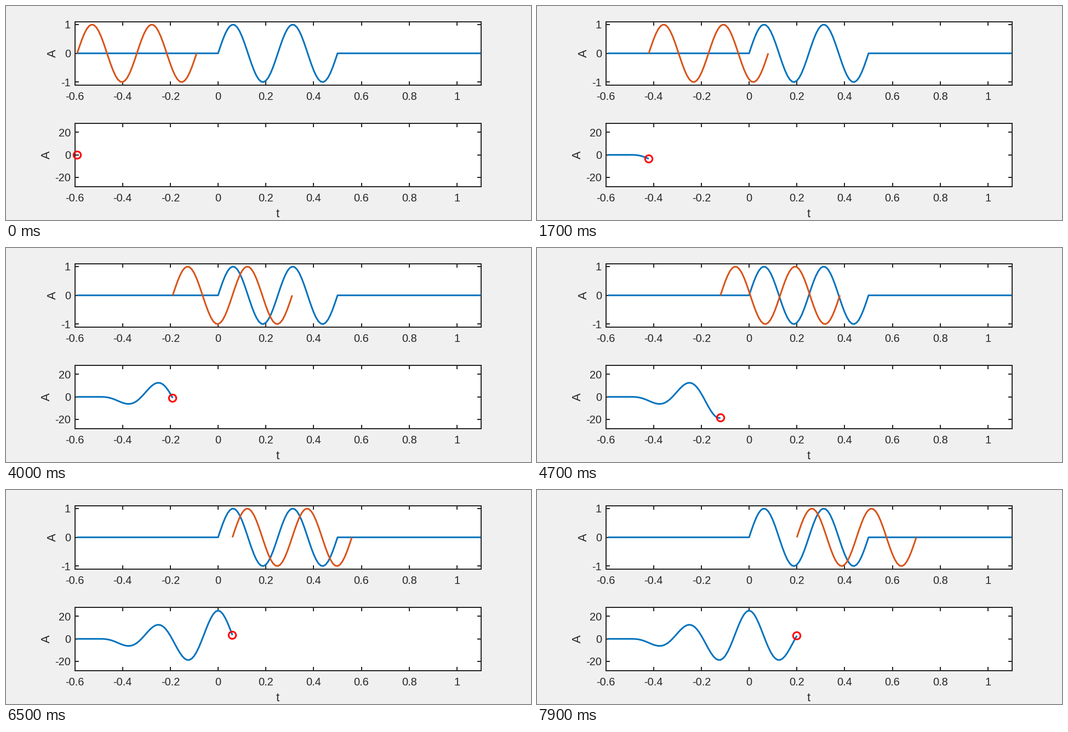
A matplotlib script for the animation above (8 s loop, 958x392 px).

```python
import numpy as np
import matplotlib.pyplot as plt
from matplotlib.animation import FuncAnimation
from matplotlib.patches import Circle
from matplotlib.transforms import Affine2D

W, H, DPI = 958, 392, 64
PT = 72 / DPI  # points per pixel
FRAMES, INTERVAL = 80, 100

INK, BLUE, ORANGE = "#262626", "#0072BD", "#D95319"
LEFT, RIGHT, HALF = 125.5, 866.5, 58
XMIN, XMAX = -0.6, 1.1
XTICKS = np.arange(-3, 6) / 5

fig = plt.figure(figsize=(W / DPI, H / DPI), dpi=DPI, facecolor="#F0F0F0")
# Pixel coordinates with the origin at the top left.
PX = Affine2D().scale(1, -1).translate(0, H).scale(1 / DPI) + fig.dpi_scale_trans


def to_px_x(x):
    return LEFT + (x - XMIN) / (XMAX - XMIN) * (RIGHT - LEFT)


def text(x, y, s, size=20, ha="center", rotation=0):
    fig.text(x, y, s, transform=PX, fontsize=size * PT, family="Liberation Sans",
             color=INK, ha=ha, va="baseline", rotation=rotation,
             rotation_mode="anchor")


def make_axes(mid, ylim, yticks, label_x):
    ax = fig.add_axes([LEFT / W, 1 - (mid + HALF) / H,
                       (RIGHT - LEFT) / W, 2 * HALF / H])
    ax.set(xlim=(XMIN, XMAX), ylim=(-ylim, ylim), xticks=XTICKS, yticks=yticks)
    ax.tick_params(direction="in", length=7.4 * PT, width=2 * PT, color=INK,
                   top=True, right=True, labelleft=False, labelbottom=False)
    for spine in ax.spines.values():
        spine.set(color=INK, linewidth=2 * PT)
    for x in XTICKS:
        text(to_px_x(x), mid + HALF + 27.5, f"{x:g}")
    for y in yticks:
        text(118, mid - y / ylim * HALF + 7.3, f"{y:g}", ha="right")
    text(label_x, mid, "A", size=22, rotation=90)
    return ax


def curve(ax, x, y, color):
    return ax.plot(x, y, color=color, lw=3 * PT, solid_capstyle="butt",
                   solid_joinstyle="round", snap=False, clip_on=False, zorder=3)[0]


TOP_MID, LOW_MID, LOW_LIM = 86.7, 272.7, 28
top = make_axes(TOP_MID, 1.1, (-1, 0, 1), 91)
low = make_axes(LOW_MID, LOW_LIM, (-20, 0, 20), 80)
text(496, 387, "t", size=22)

# Two-cycle pulse sampled every 0.01, and its running correlation.
t = np.arange(-59, 111) / 100
n = np.arange(51)
pulse = np.sin(2 * np.pi * n / 25)
signal = np.zeros(t.size)
signal[59:110] = pulse
corr = np.concatenate([np.zeros(9), np.convolve(pulse, pulse[::-1])])

curve(top, t, signal, BLUE)
probe = curve(top, [], [], ORANGE)
trace = curve(low, [], [], BLUE)
dot = Circle((0, 0), 6.67, fill=False, edgecolor="red", lw=3 * PT,
             transform=PX, zorder=4)
fig.add_artist(dot)


def update(k):
    probe.set_data(t[k] + n / 100, pulse)
    trace.set_data(t[:k + 1], corr[:k + 1])
    # The marker sits on whole pixels.
    dot.center = (round(to_px_x(t[k])),
                  round(LOW_MID - corr[k] / LOW_LIM * HALF))
    return probe, trace, dot


anim = FuncAnimation(fig, update, frames=FRAMES, interval=INTERVAL,
                     repeat=True, repeat_delay=0)
plt.show()
```
